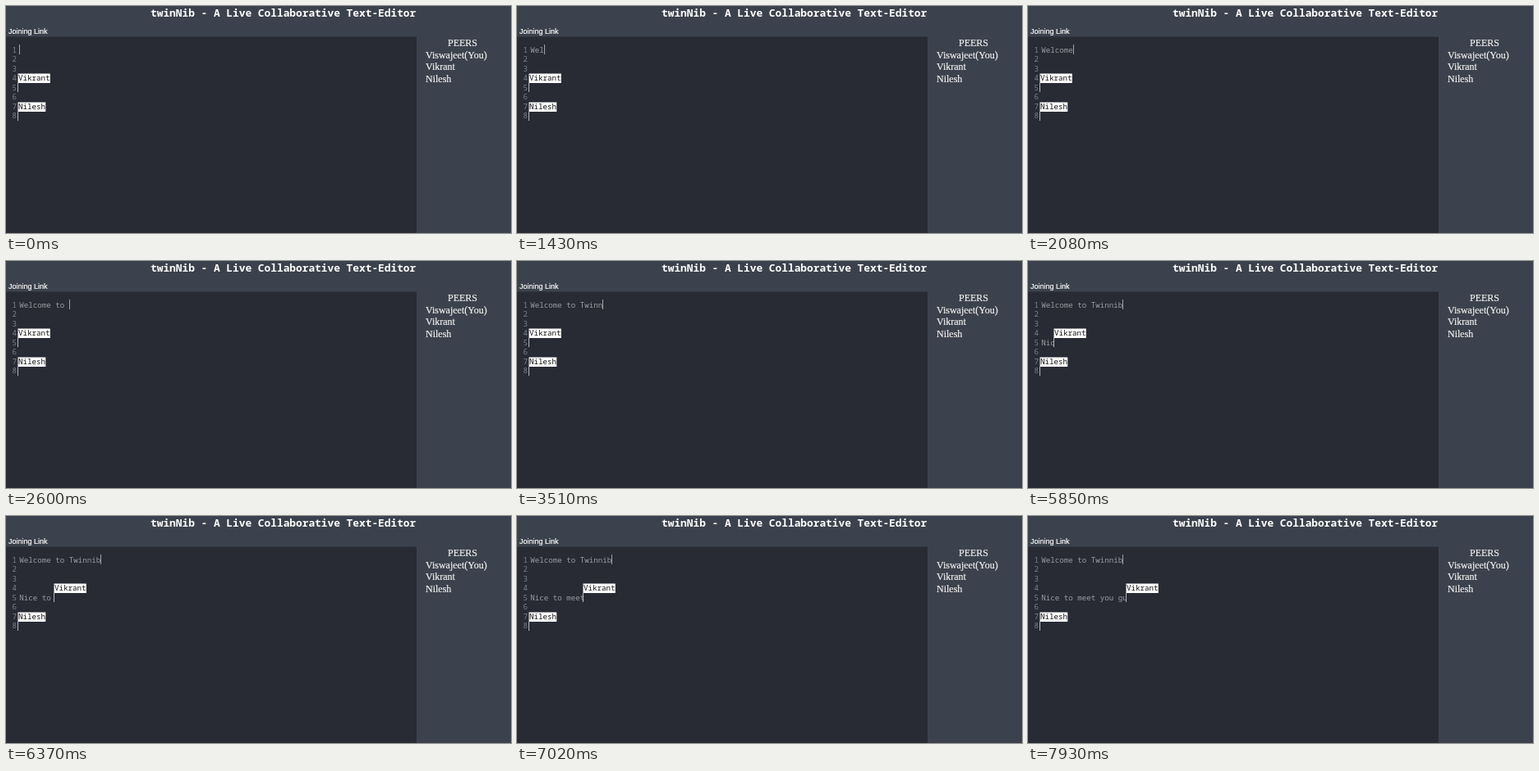
An HTML page that plays this animation: 615x277 px, repeating every 8000 ms.

```html
<!DOCTYPE html>
<html lang="en">
<head>
<meta charset="utf-8">
<title>Live text editor</title>
<style>
  html, body { margin: 0; width: 100%; height: 100%; overflow: hidden; background: #3c424d; }
  svg { display: block; width: 615px; height: 277px; }
  text { white-space: pre; }
  .title { font: bold 12.83px "Noto Sans Mono", monospace; fill: #fff; }
  .link { font: 9px "Liberation Sans", Arial, sans-serif; fill: #fff; stroke: #fff; stroke-width: .2px; }
  .peers { font: 12px "Liberation Serif", "Times New Roman", serif; fill: #f0f0f0; stroke: #f0f0f0; stroke-width: .2px; }
  .code { font: 9.18px "Noto Sans Mono", monospace; fill: #9b9da3; }
  .code .number { fill: #7d8188; text-anchor: end; }
  .code .name { fill: #111; }
</style>
</head>
<body>
<svg viewBox="0 0 615 277">
  <rect width="615" height="277" fill="#3c424d"/>
  <rect y="37.5" width="500" height="239.5" fill="#282a34"/>
  <text class="title" x="176" y="13">twinNib - A Live Collaborative Text-Editor</text>
  <text class="link" x="3" y="34">Joining Link</text>
  <g class="peers">
    <text x="538" y="49">PEERS</text>
    <text x="511" y="63.5">Viswajeet(You)</text>
    <text x="511" y="78">Vikrant</text>
    <text x="511" y="92.5">Nilesh</text>
  </g>
  <g class="code" id="code"></g>
</svg>
<script>
const LOOP = 8000;
const TICK = 130;
const CHAR = 5.51;
const LINE = 11.53;
const TEXT_X = 16.3;
const BLINK = { period: 8 * TICK, on: 5 * TICK };
const code = document.getElementById('code');

// Typing comes in bursts of evenly spaced keys
const burst = (text, start, step = TICK) => ({ text, start, step });
const greeting = [
  burst('We', 910), burst('lcom', 1430), burst('e to ', 2080),
  burst('Twin', 2860), burst('nib', 3510)
];
const reply = [
  burst('Ni', 5330), burst('ce to me', 5850, 104),
  burst('et you g', 6890, 74), burst('u', 7930)
];

function typedAt(bursts, time) {
  let text = '', lastKey = 0;
  for (const part of bursts) {
    if (time < part.start) break;
    const count = Math.min(part.text.length, Math.floor((time - part.start) / part.step) + 1);
    text += part.text.slice(0, count);
    lastKey = part.start + (count - 1) * part.step;
  }
  return { text, lastKey };
}

function add(tag, attrs, parent = code, content = '') {
  const node = document.createElementNS('http://www.w3.org/2000/svg', tag);
  for (const key in attrs) node.setAttribute(key, attrs[key]);
  node.textContent = content;
  return parent.appendChild(node);
}

const baseline = line => 56.6 + (line - 1) * LINE;

function addPeer(name, line) {
  const group = add('g', {});
  const top = Math.round(baseline(line) - 8.5);
  add('rect', { x: 14.5, y: top - 11.5, width: name.length * CHAR + .7, height: 11.5, fill: '#fff' }, group);
  add('text', { class: 'name', x: 15, y: baseline(line - 1) }, group, name);
  add('rect', { x: 14, y: top, width: 1, height: 11, fill: '#b4b5b9' }, group);
  return group;
}

for (let n = 1; n <= 8; n++) add('text', { class: 'number', x: 13, y: baseline(n) }, code, n);
const greetingNode = add('text', { x: TEXT_X, y: baseline(1) });
const replyNode = add('text', { x: TEXT_X, y: baseline(5) });
const caret = add('rect', { y: 47, width: 1, height: 12, fill: '#a0a2a7' });
const writer = addPeer('Vikrant', 5);
addPeer('Nilesh', 8);

function draw() {
  const time = Math.floor(performance.now() % LOOP / TICK) * TICK;
  const own = typedAt(greeting, time);
  const remote = typedAt(reply, time);
  const lit = (time - own.lastKey) % BLINK.period < BLINK.on;

  greetingNode.textContent = own.text;
  caret.setAttribute('x', Math.round(16 + own.text.length * CHAR));
  caret.setAttribute('visibility', lit ? 'visible' : 'hidden');
  replyNode.textContent = remote.text;
  writer.setAttribute('transform', `translate(${Math.round(remote.text.length * CHAR)} 0)`);
  requestAnimationFrame(draw);
}
draw();
</script>
</body>
</html>
```
